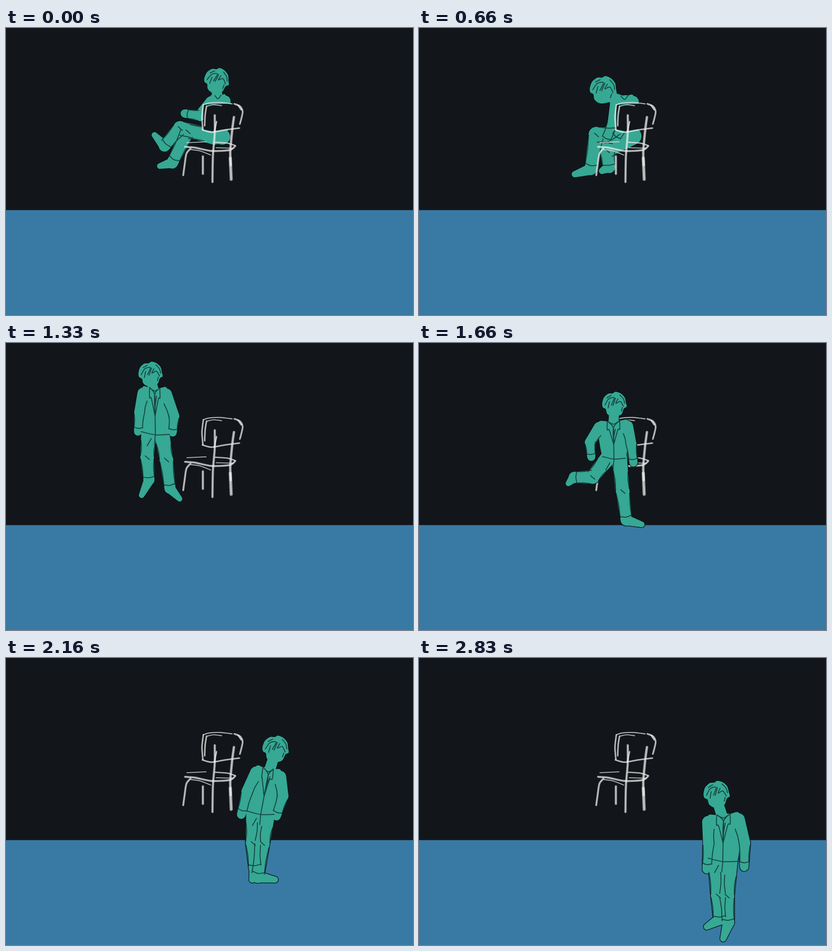
An HTML page that plays this animation: 891x628 px, repeating every 3 s.

```html
<!DOCTYPE html>
<html lang="en">
<head>
<meta charset="utf-8">
<title>Leaving the chair</title>
<style>
html, body { margin: 0; width: 100%; height: 100%; overflow: hidden; background: #12161a; }
svg { display: block; width: 100vw; height: 100vh; }
path { stroke-linecap: round; stroke-linejoin: round; }
#chair { fill: none; stroke: #ededed; }
#panel { fill: #12161a; stroke: none; }
#edge { fill: #071519; stroke: #071519; stroke-width: 3.4; opacity: .8; }
#body { fill: #36a893; }
#ink { fill: none; stroke: #071519; stroke-width: 2; stroke-opacity: .66; }
</style>
</head>
<body>
<svg id="stage" viewBox="0 0 891 628" preserveAspectRatio="none">
  <rect width="891" height="628" fill="#12161a"/>
  <rect y="398.5" width="891" height="230" fill="#397aa4"/>
  <g id="figure"><g id="edge"></g><g id="body"></g><path id="ink"/></g>
  <g id="chair"><path id="panel" d="M432 168L498 165 517 184 512 217 452 226 432 222Z"/></g>
</svg>
<script>
const $ = id => document.getElementById(id);
const parse = text => text.split(' ').map(s => s.split(',').map(Number));
const lerp = (a, b, k) => a.map((v, i) => v + (b[i] - v) * k);
const add = (p, x, y) => [p[0] + x, p[1] + y];
const fix = p => p.map(v => v.toFixed(1)).join(' ');

// Smooth curve through all points.
function curve(p, closed) {
  const n = p.length;
  const at = i => closed ? p[(i + n) % n] : p[Math.max(0, Math.min(n - 1, i))];
  let d = 'M' + fix(p[0]);
  for (let i = 0; i < (closed ? n : n - 1); i++) {
    const [a, b, c, e] = [at(i - 1), at(i), at(i + 1), at(i + 2)];
    const out = b.map((v, k) => v + (c[k] - a[k]) / 7);
    const into = c.map((v, k) => v - (e[k] - b[k]) / 7);
    d += `C${fix(out)} ${fix(into)} ${fix(c)}`;
  }
  return d + (closed ? 'Z' : '');
}

// Tapered limb from a to b, with helpers for marks on it.
function limb(a, b, ra, rb) {
  const len = Math.hypot(b[0] - a[0], b[1] - a[1]) || 1;
  const n = [(a[1] - b[1]) / len, (b[0] - a[0]) / len];
  const on = (k, side) => {
    const r = (ra + (rb - ra) * k) * side;
    return add(lerp(a, b, k), n[0] * r, n[1] * r);
  };
  const [p, q, u, v] = [on(0, 1), on(1, 1), on(1, -1), on(0, -1)].map(fix);
  return {
    shape: `M${p}L${q}A${rb} ${rb} 0 0 0 ${u}L${v}A${ra} ${ra} 0 0 0 ${p}Z`,
    line: (from, to, side) => curve([on(from, side), on((from + to) / 2, side * .9), on(to, side)]),
    cross: k => curve([on(k, 1), on(k + .05, 0), on(k, -1)])
  };
}

const skull = parse('-30,1 -26,-14 -15,-24 -4,-25 3,-29 16,-25 26,-15 29,-2 31,8 24,13 18,27 3,33 -9,32 -18,25 -21,14 -28,10');
const strands = ['-23,4 -14,-11 0,-14 -7,4', '3,-13 -3,5', '-15,11 -12,-4', '9,-11 4,0 15,-5 23,7', '14,-21 23,-11 26,0', '-18,-14 -8,-20', '20,10 18,19'].map(parse);

function build({ look: [tilt, size, front], head, hem, armL, armR, legL, legR }) {
  const shapes = [], marks = [];
  const joints = list => [0, 2, 4].map(i => list.slice(i, i + 2));
  const part = (a, b, ra, rb) => {
    const l = limb(a, b, ra * size, rb * size);
    shapes.push(l.shape);
    return l;
  };
  const hemL = hem.slice(0, 2), hemR = hem.slice(2);
  const leg = (hip, list) => {
    const [knee, ankle, toe] = joints(list);
    const thigh = part(hip, knee, 19, 17), shin = part(knee, ankle, 17, 14);
    part(ankle, toe, 13, 7);
    marks.push(thigh.line(.35, .95, 1), thigh.line(.45, .95, -1),
      shin.line(.05, .9, 1), shin.line(.1, .9, -1), shin.cross(.85),
      curve([shin, thigh].map((_, i) => add(knee, i * 9 - 4, i * 8 - 3))));
  };
  leg(lerp(hemL, hemR, .27), legL);
  leg(lerp(hemL, hemR, .73), legR);

  const [shL] = joints(armL), [shR] = joints(armR);
  const neck = lerp(shL, shR, .5), waist = add(lerp(hemL, hemR, .5), 0, 4);
  const nL = add(lerp(shL, shR, .28), 0, -15 * size), nR = add(lerp(shL, shR, .72), 0, -15 * size);
  shapes.push(curve([nL, add(shL, -3, -8), hemL, waist, hemR, add(shR, 3, -8), nR], true));

  for (const [list, inner] of [[armL, -1], [armR, 1]]) {
    const [sh, elbow, hand] = joints(list);
    const upper = part(sh, elbow, 14, 13), fore = part(elbow, hand, 13, 10);
    marks.push(upper.line(.35, 1, inner), fore.line(0, .8, inner), fore.line(.1, .8, -inner), fore.cross(.78));
  }

  const rad = tilt * Math.PI / 180, c = Math.cos(rad) * size, s = Math.sin(rad) * size;
  const place = ([x, y]) => add(head, x * c - y * s, x * s + y * c);
  part(place([0, 12]), neck, 12, 13);
  shapes.push(curve(skull.map(place), true));
  marks.push(...strands.map(p => curve(p.map(place))));

  marks.push(curve([nL, add(neck, 0, -6), nR]));
  if (front > .5) {
    const button = lerp(neck, waist, .55);
    const lapel = (n, sh) => {
      const notch = lerp(lerp(n, sh, .35), button, .3);
      return curve([n, notch, add(lerp(notch, button, .12), (button[0] - n[0]) * .2, -3), button]);
    };
    const knot = add(neck, 0, 2);
    marks.push(lapel(nL, shL), lapel(nR, shR), curve([nL, knot, button]), curve([nR, knot, button]),
      curve([add(knot, 4, 3), lerp(knot, button, .6)]),
      curve([button, lerp(button, waist, .5), waist]), curve([hemL, waist, hemR]),
      curve([waist, add(waist, -2, 22)]), curve([add(waist, -9, 8), add(waist, -18, 24)]));
  }
  return { body: shapes.map(d => `<path d="${d}"/>`).join(''), ink: marks.join('') };
}

const mix = (a, b, k) => Object.fromEntries(Object.keys(a).map(key => [key, lerp(a[key], b[key], k)]));
function move(p, dx, dy, k = 1) {
  const shift = (v, i) => v * k + (i % 2 ? dy : dx);
  const q = Object.fromEntries(Object.entries(p).map(([key, list]) => [key, list.map(shift)]));
  return { ...q, look: [p.look[0], p.look[1] * k, p.look[2]] };
}

// look: head tilt, size, facing front. Arms: shoulder, elbow, hand. Legs: knee, ankle, toe.
const crossed = {
  look: [9, .9, 0], head: [461, 113], hem: [445, 238, 484, 238],
  armL: [449, 162, 424, 192, 391, 187], armR: [479, 160, 480, 195, 476, 225],
  legL: [381, 219, 347, 258, 325, 234], legR: [398, 226, 364, 295, 337, 302]
};
const lean = {
  look: [10, .93, 0], head: [432, 115], hem: [445, 239, 482, 238],
  armL: [437, 160, 419, 195, 399, 213], armR: [474, 158, 457, 205, 425, 225],
  legL: [379, 228, 349, 276, 321, 280], legR: [396, 234, 370, 295, 348, 305]
};
const bent = {
  look: [4, .97, 0], head: [403, 133], hem: [446, 238, 477, 236],
  armL: [432, 164, 426, 205, 407, 250], armR: [468, 161, 454, 205, 427, 245],
  legL: [388, 233, 376, 309, 341, 320], legR: [412, 268, 416, 304, 400, 313]
};
const rise = {
  ...bent, look: [3, .93, 0], head: [406, 86], hem: [446, 230, 475, 226],
  armL: [421, 130, 415, 172, 401, 212], armR: [446, 128, 450, 185, 430, 220]
};
const stand = {
  look: [0, .87, 1], head: [316, 66], hem: [296, 194, 358, 200],
  armL: [300, 110, 292, 152, 289, 194], armR: [351, 112, 368, 160, 365, 196],
  legL: [309, 250, 313, 300, 297, 333], legR: [351, 255, 359, 318, 380, 341]
};
const stepDown = {
  look: [0, .92, 1], head: [328, 91], hem: [304, 220, 363, 224],
  armL: [304, 132, 288, 168, 282, 212], armR: [358, 131, 380, 165, 386, 205],
  legL: [309, 282, 299, 320, 275, 337], legR: [357, 300, 359, 384, 384, 393]
};
const run = {
  look: [0, 1, 1], head: [497, 190], hem: [468, 322, 525, 326],
  armL: [460, 250, 437, 287, 440, 323], armR: [530, 247, 539, 290, 545, 338],
  legL: [443, 373, 397, 374, 383, 389], legR: [518, 408, 527, 480, 566, 491]
};
const pass = {
  look: [0, .98, 1], head: [521, 193], hem: [490, 333, 546, 335],
  armL: [478, 254, 459, 290, 465, 332], armR: [551, 252, 566, 295, 569, 337],
  legL: [499, 405, 475, 455, 455, 457], legR: [530, 410, 530, 481, 570, 491]
};
const pause = {
  look: [5, .95, 1], head: [590, 197], hem: [528, 335, 587, 342],
  armL: [548, 250, 528, 292, 515, 343], armR: [600, 260, 606, 302, 592, 346],
  legL: [541, 405, 545, 460, 539, 485], legR: [561, 405, 551, 479, 589, 485]
};
const walk = {
  look: [0, .94, 1], head: [713, 264], hem: [680, 397, 750, 401],
  armL: [682, 307, 678, 355, 675, 402], armR: [742, 308, 768, 360, 769, 405],
  legL: [689, 475, 693, 537, 671, 569], legR: [736, 465, 728, 503, 724, 522]
};
const last = {
  look: [-2, .94, 1], head: [651, 296], hem: [633, 438, 697, 445],
  armL: [633, 359, 634, 405, 630, 462], armR: [700, 353, 713, 405, 712, 457],
  legL: [655, 520, 658, 572, 630, 588], legR: [674, 520, 677, 580, 666, 614]
};

const poses = [
  crossed, move(mix(crossed, lean, .3), 4, -3), mix(crossed, lean, .65), lean, bent, rise,
  move(stand, 19, -20), move(stand, 6, -13), stand, stepDown, move(run, -10, -35, .88),
  run, pass, pause, move(mix(pause, walk, .5), 0, -4), walk, mix(walk, last, .45), last
].map(build);
const starts = [0, 160, 330, 500, 660, 830, 1000, 1160, 1330, 1500, 1660, 1830, 2000, 2160, 2330, 2500, 2660, 2830];
const SEATED = 6, LOOP = 3000;

// One rough chalk stroke: a wide soft line and a thin bright one.
function brush(width, text) {
  for (const [scale, alpha] of [[1, .58], [.45, .55]]) {
    const p = document.createElementNS('http://www.w3.org/2000/svg', 'path');
    p.setAttribute('d', curve(parse(text)));
    p.setAttribute('stroke-width', width * scale);
    p.setAttribute('stroke-opacity', alpha);
    $('chair').append(p);
  }
}
brush(2.4, '432,168 445,164 470,163 495,166');
brush(2.2, '440,171 455,168 472,170');
brush(3.6, '432,168 429,195 431,222');
brush(3.6, '439,171 436,190 435,214');
brush(3.6, '430,223 450,228 480,223 511,219');
brush(4, '500,166 512,171 518,182 516,195 512,210');
brush(3.4, '508,169 515,179');
brush(2, '396,251 438,249');
brush(3, '458,250 485,252 501,257');
brush(4.4, '392,260 415,262 450,269 490,267 502,258');
brush(2.2, '405,266 425,269 448,278');
brush(2.2, '460,262 497,263');
brush(4.4, '404,264 395,275 391,300 388,322');
brush(5, '431,281 431,319');
brush(5, '457,191 457,230 453,280 452,337');
brush(3.4, '461,205 456,228');
brush(5.6, '499,195 495,225 491,270 492,300');
brush(7, '491,285 493,331');

let shown = -1;
function draw(t) {
  const i = starts.findLastIndex(s => s <= t);
  if (i === shown) return;
  shown = i;
  $('body').innerHTML = $('edge').innerHTML = poses[i].body;
  $('ink').setAttribute('d', poses[i].ink);
  $('stage').append(...(i < SEATED ? [$('figure'), $('chair')] : [$('chair'), $('figure')]));
}
function tick() {
  draw(performance.now() % LOOP);
  requestAnimationFrame(tick);
}
tick();
</script>
</body>
</html>
```
